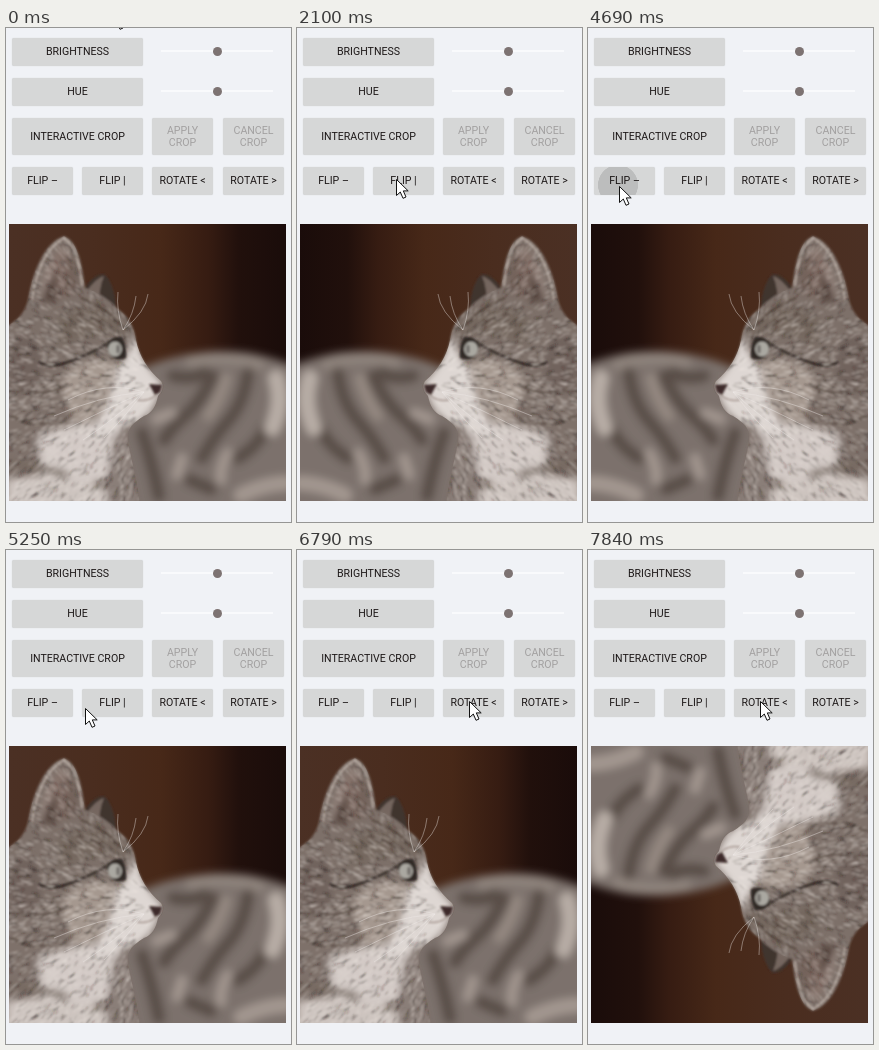
Animation, 285 px wide and 494 px high, one loop 8 s. Source, as an HTML page:

```html
<!DOCTYPE html>
<html lang="en">
<head>
<meta charset="utf-8">
<title>Image editor: flip and rotate</title>
<style>
  html, body { margin: 0; width: 100%; height: 100%; overflow: hidden; background: #f0f2f6; }
  body { position: relative; font: 400 10.6px/12.3px Roboto, Arial, sans-serif; color: #1c1717; }

  .btn {
    position: absolute; display: flex; align-items: center; justify-content: center;
    left: var(--x); top: var(--y); width: 61px; height: 28px;
    box-sizing: border-box; padding-top: 1px;
    overflow: hidden; text-align: center; white-space: nowrap;
    background: #d6d7d7; border-radius: 2px; box-shadow: 0 0 1px #c9cbcd;
  }
  .wide { width: 131px; }
  .tall { height: 37px; }
  .off { color: #a2a0a0; }

  .slider { position: absolute; left: 155px; width: 112px; height: 2px; background: #f9fafc; }
  .slider::after {
    content: ""; position: absolute; left: 52px; top: -3.5px;
    width: 9px; height: 9px; border-radius: 50%; background: #7d7372;
  }

  .ripple {
    position: absolute; left: var(--x); top: var(--y);
    width: 40px; height: 40px; margin: -20px; border-radius: 50%;
    background: #000; opacity: 0;
    animation: ripple 8s step-end calc(var(--t) - 8002ms) infinite;
  }
  @keyframes ripple {
    0% { opacity: .12; transform: none; }
    .875% { opacity: .09; transform: scale(4); }
    2.625% { opacity: .04; transform: scale(4); }
    3.5%, 100% { opacity: 0; transform: none; }
  }

  #photo {
    position: absolute; left: 3px; top: 196px; width: 277px; height: 277px; overflow: hidden;
    animation: turn 8s step-end -2ms infinite;
  }
  @keyframes turn {
    0%, 59.5%, 78.75% { transform: none; }
    14%, 42.875% { transform: scale(-1, 1); }
    30.625% { transform: scale(-1, -1); }
    70.875% { transform: scale(1, -1); }
    88.375% { transform: rotate(-90deg); }
    95.375%, 100% { transform: rotate(180deg); }
  }

  /* The pointer advances once every 70 ms. */
  #pointer {
    position: absolute; left: 0; top: 1px; width: 13px; height: 21px; overflow: visible;
    animation: point 8s -2ms infinite;
  }
  @keyframes point {
    0% { transform: translate(107px, -19px); animation-timing-function: steps(4); }
    3.5% { transform: translate(52px, 100px); animation-timing-function: steps(3); }
    6.125% { transform: translate(28px, 150px); animation-timing-function: steps(2); }
    7.875% { transform: translate(35px, 153px); }
    18.375% { transform: translate(35px, 153px); animation-timing-function: steps(9); }
    26.25% { transform: translate(99px, 150px); }
    31.5% { transform: translate(99px, 150px); animation-timing-function: steps(5); }
    35.875% { transform: translate(143px, 152px); animation-timing-function: steps(5); }
    40.25% { transform: translate(104px, 153px); }
    48.125% { transform: translate(104px, 153px); animation-timing-function: steps(3); }
    50.75% { transform: translate(128px, 156px); animation-timing-function: steps(6); }
    56% { transform: translate(31px, 157px); }
    63% { transform: translate(31px, 157px); animation-timing-function: steps(5); }
    67.375% { transform: translate(111px, 157px); }
    80.5% { transform: translate(111px, 157px); animation-timing-function: steps(5); }
    84.875%, 100% { transform: translate(172px, 150px); }
  }
</style>
</head>
<body>
  <div class="btn wide" style="--x:6px;--y:10px">BRIGHTNESS</div>
  <div class="slider" style="top:22px"></div>
  <div class="btn wide" style="--x:6px;--y:50px">HUE</div>
  <div class="slider" style="top:62px"></div>
  <div class="btn wide tall" style="--x:6px;--y:90px">INTERACTIVE CROP</div>
  <div class="btn tall off" style="--x:146px;--y:90px">APPLY<br>CROP</div>
  <div class="btn tall off" style="--x:217px;--y:90px">CANCEL<br>CROP</div>
  <div class="btn" style="--x:6px;--y:139px">FLIP –
    <i class="ripple" style="--x:29px;--y:14px;--t:1050ms"></i>
    <i class="ripple" style="--x:24px;--y:18px;--t:4690ms"></i>
  </div>
  <div class="btn" style="--x:76px;--y:139px">FLIP |
    <i class="ripple" style="--x:23px;--y:11px;--t:2380ms"></i>
    <i class="ripple" style="--x:28px;--y:14px;--t:3360ms"></i>
    <i class="ripple" style="--x:35px;--y:18px;--t:5600ms"></i>
    <i class="ripple" style="--x:35px;--y:18px;--t:6230ms"></i>
  </div>
  <div class="btn" style="--x:146px;--y:139px">ROTATE &lt;
    <i class="ripple" style="--x:26px;--y:11px;--t:7000ms"></i>
    <i class="ripple" style="--x:26px;--y:11px;--t:7560ms"></i>
  </div>
  <div class="btn" style="--x:217px;--y:139px">ROTATE &gt;</div>

  <svg id="photo" viewBox="3 196 277 277">
    <defs>
      <linearGradient id="wall">
        <stop offset="0" stop-color="#4b3024"/>
        <stop offset=".3" stop-color="#4a2d1f"/>
        <stop offset=".55" stop-color="#472818"/>
        <stop offset=".72" stop-color="#361c12"/>
        <stop offset=".83" stop-color="#21100c"/>
        <stop offset="1" stop-color="#1a0c0a"/>
      </linearGradient>
      <linearGradient id="inner">
        <stop offset="0" stop-color="#a3938c"/>
        <stop offset=".5" stop-color="#85726a"/>
        <stop offset="1" stop-color="#695850"/>
      </linearGradient>
      <filter id="far" x="-40%" y="-40%" width="180%" height="180%"><feGaussianBlur stdDeviation="4"/></filter>
      <filter id="mid" x="-40%" y="-40%" width="180%" height="180%"><feGaussianBlur stdDeviation="3.5"/></filter>
      <filter id="near" x="-10%" y="-20%" width="120%" height="140%"><feGaussianBlur stdDeviation=".9"/></filter>
      <path id="head" d="M0 299C10 293 18 287 22 272C26 245 38 214 58 208C70 212 76 231 79 260
        Q98 266 112 281C122 288 128 298 130 312C133 328 142 342 155 353C158 358 157 363 152 368
        C150 378 146 385 138 388C126 395 120 402 122 414C127 440 132 455 134 476H0Z"/>
      <clipPath id="cut"><use href="#head"/></clipPath>
    </defs>

    <rect x="3" y="196" width="277" height="277" fill="url(#wall)"/>

    <g filter="url(#far)">
      <path d="M115 350C160 326 200 321 236 324C262 327 278 334 300 342V495H110Z" fill="#7c716c"/>
      <g fill="none" stroke="#50453f" stroke-width="13" stroke-linecap="round" opacity=".8">
        <path d="M167 348Q185 352 198 345"/>
        <path d="M207 348Q194 375 180 387T158 412"/>
        <path d="M242 345Q238 375 222 393T196 430"/>
        <path d="M262 398Q250 420 232 430"/>
        <path d="M136 405Q145 430 153 468M184 452L205 461"/>
      </g>
      <g fill="none" stroke="#a39790" stroke-width="10" stroke-linecap="round">
        <path d="M270 350Q278 375 266 400" stroke="#b8ada6" stroke-width="16"/>
        <path d="M185 334Q220 327 254 337" stroke="#8f847d"/>
        <path d="M220 350Q214 372 202 388" stroke="#968a82"/>
        <path d="M166 385L150 391M222 425Q213 440 215 452M176 430L171 447"/>
        <path d="M235 467Q258 456 280 455" stroke-width="15"/>
      </g>
    </g>

    <g filter="url(#near)">
      <path d="M78 262C84 250 92 246 98 246C106 252 110 268 111 288L82 286Z" fill="#41342f"/>
      <path d="M80 264Q90 250 98 248Q92 262 94 278Z" fill="#74665e"/>
      <use href="#head" fill="#7d7069"/>
    </g>
    <g clip-path="url(#cut)">
      <g filter="url(#mid)">
        <path d="M32 280C36 248 46 224 57 216C67 224 71 245 72 265Q48 270 32 280Z" fill="url(#inner)"/>
        <path d="M34 276Q42 250 53 242Q48 262 52 272Z" fill="#54453e"/>
        <path d="M50 290Q85 268 116 288L124 310Q95 298 56 318Z" fill="#74675e"/>
        <ellipse cx="18" cy="340" rx="18" ry="35" fill="#71645d"/>
        <ellipse cx="18" cy="400" rx="24" ry="36" fill="#7e716a"/>
        <path d="M58 345Q92 322 120 338Q112 380 78 400Q52 385 58 345Z" fill="#a5988f"/>
        <path d="M32 408Q65 392 116 396L108 445Q70 470 34 445Z" fill="#d3cac6"/>
        <path d="M111 340Q122 330 129 305Q137 338 156 354L152 369C148 381 140 390 127 396
          Q104 402 80 412Q108 374 111 340Z" fill="#ded7d3"/>
        <path d="M108 405Q124 402 126 420L134 478H92Q104 445 108 405Z" fill="#8a7e78"/>
        <path d="M0 452Q45 440 100 462V480H0Z" fill="#cdc4bf"/>
        <path d="M0 436Q30 436 62 448" fill="none" stroke="#75685f" stroke-width="7"/>
      </g>
      <g fill="none" stroke="#42372f" stroke-width="2.6" filter="url(#near)">
        <path d="M33 333Q40 342 62 334Q85 326 104 314" stroke="#382e2a"/>
        <path d="M60 284Q86 286 110 305" stroke="#5f5148"/>
        <path d="M75 270Q98 278 119 300" stroke="#5f5148"/>
        <path d="M15 362Q38 370 62 356M5 388Q26 400 44 394" stroke="#62554d"/>
        <path d="M26 272Q33 224 58 210Q72 218 76 258" stroke="#b3a69d" stroke-width="2"/>
      </g>
      <g fill="none" stroke-width=".8" filter="url(#near)">
        <path id="dark" stroke="#2c221e" opacity=".65"/>
        <path id="light" stroke="#efe7e1" opacity=".6"/>
      </g>
    </g>

    <g filter="url(#near)">
      <path d="M100 317Q106 307 116 309Q121 317 120 330Q110 334 104 327Z" fill="#332a27"/>
      <ellipse cx="109" cy="321" rx="7" ry="7.5" fill="#aaa8a1"/>
      <ellipse cx="112" cy="321" rx="2" ry="4.5" fill="#77736e"/>
      <path d="M143 356L156 357L154 364L149 367Z" fill="#3e2c29"/>
      <path d="M150 367Q143 374 131 372" fill="none" stroke="#8a7770"/>
    </g>
    <path id="whiskers" fill="none" stroke="#eee9e6" stroke-width=".7" opacity=".6"/>
  </svg>

  <svg id="pointer" viewBox="0 0 13 21">
    <path d="M.5 .5V16.5L4.3 13L7 19.3L10 18L7.3 11.9H12.2Z" fill="#fff" stroke="#111"/>
  </svg>

<script>
  let seed = 7;
  const random = () => (seed = seed * 16807 % 2147483647) / 2147483647;
  const draw = (id, d) => document.getElementById(id).setAttribute('d', d);

  // Short hairs that lie away from the nose.
  function fur(count) {
    let d = '';
    for (let i = 0; i < count; i++) {
      const x = random() * 145, y = 215 + random() * 260;
      const angle = Math.atan2(y - 350, x - 160) + (random() - .5) * .6;
      const size = 3 + random() * 5;
      d += `M${x} ${y}l${Math.cos(angle) * size} ${Math.sin(angle) * size}`;
    }
    return d;
  }
  draw('dark', fur(1000));
  draw('light', fur(1000));

  const cheek = [[62, 372], [48, 388], [58, 402], [77, 412], [98, 410]]
    .map(([x, y]) => `M138 364Q${(138 + x) / 2} ${y - 20} ${x} ${y}`);
  const brow = [[112, 264], [130, 268], [142, 266]]
    .map(([x, y]) => `M117 302Q${x - 2} ${y + 18} ${x} ${y}`);
  draw('whiskers', cheek.concat(brow).join(''));
</script>
</body>
</html>
```
